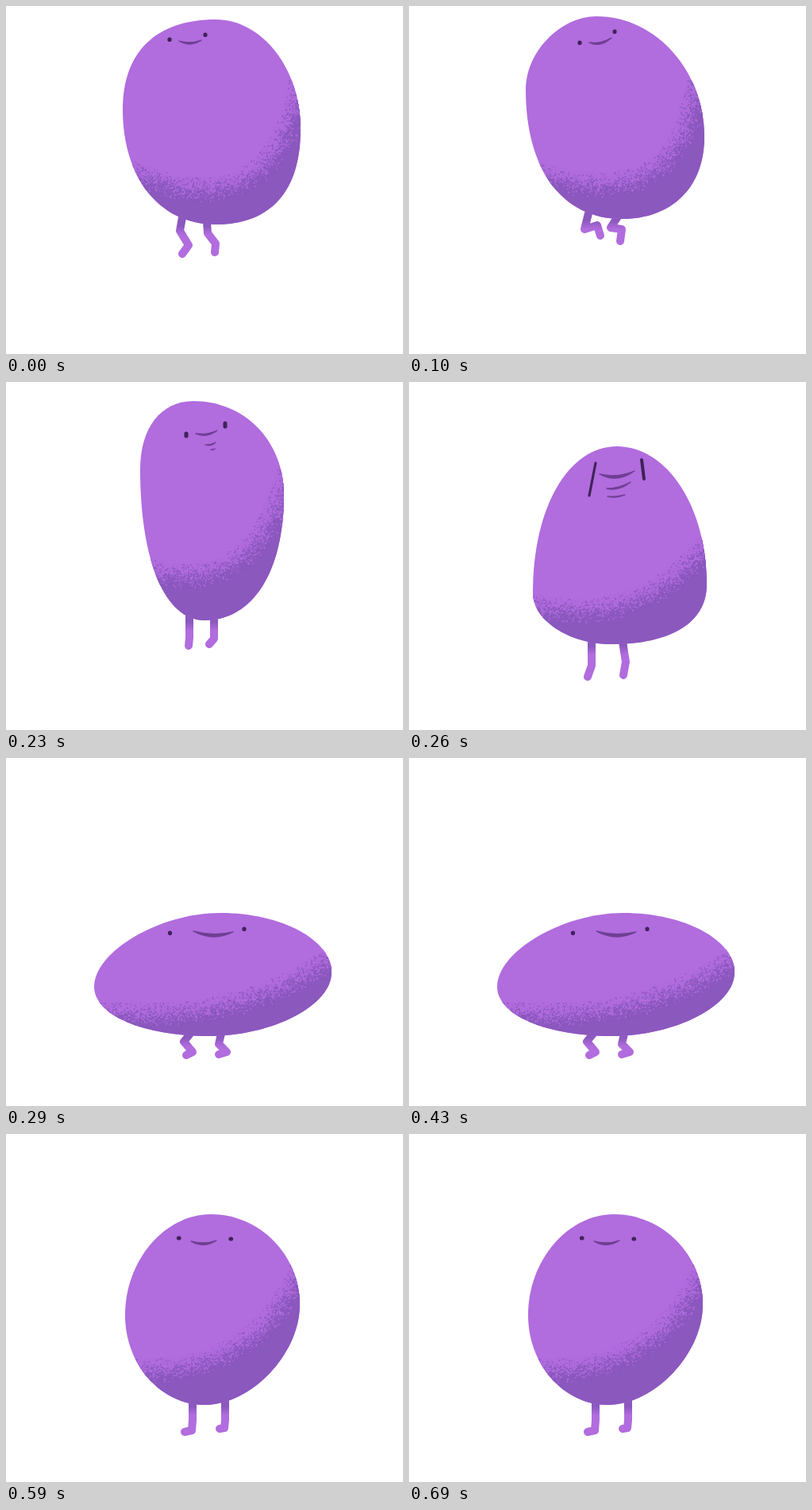
An HTML page with a canvas that plays this animation: 500 by 438 pixels, repeating every 760 ms.

```html
<!DOCTYPE html>
<html lang="en">
<head>
<meta charset="utf-8">
<title>Jumping blob</title>
<style>
html, body { margin: 0; width: 100%; height: 100%; overflow: hidden; background: #fff; }
canvas { display: block; }
</style>
</head>
<body>
<canvas id="stage" width="500" height="438"></canvas>
<script>
const ctx = document.getElementById('stage').getContext('2d');
const LIGHT = '#b16cde', DARK = '#8b58be', MOUTH = '#6f3f93', EYE = '#3f2358';

// hold: ms
// body: top, right, bottom and left extremes, each with the fullness of the arc that follows
// edge: start, control and end of the shadow's upper limit
// legs: hip, knee, ankle, toe
// eyes: x, y and the stroke they are stretched along
// lines: mouth and wrinkles as start, end, sag
const poses = [
  {
    hold: 100,
    body: [[264, 17, .55], [371, 155, .65], [264, 275, .6], [147, 130, .64]],
    edge: [155, 208, 336, 288, 372, 95],
    legs: [[222, 266, 219, 283, 230, 301, 222, 312], [253, 272, 254, 286, 264, 299, 263, 310]],
    eyes: [[206, 42, 0, .4], [251, 36, 0, .4]],
    lines: [[218, 44, 246, 43, 4.5]]
  },
  {
    hold: 130,
    body: [[236, 13, .55], [372, 165, .61], [268, 268, .62], [147, 105, .51]],
    edge: [158, 210, 343, 270, 363, 95],
    legs: [[226, 261, 221, 281, 237, 276, 241, 289], [263, 265, 254, 279, 268, 281, 266, 296]],
    eyes: [[215, 46, 0, .4], [259, 32, 0, .4]],
    lines: [[227, 46, 255, 40, 5]]
  },
  {
    hold: 30,
    body: [[236, 24, .57], [350, 142, .61], [250, 300, .61], [169, 110, .61]],
    edge: [172, 236, 314, 278, 357, 112],
    legs: [[231, 294, 231, 312, 231, 322, 230, 332], [262, 296, 262, 314, 262, 323, 256, 330]],
    eyes: [[227, 65, 0, 3], [276, 52, 0, 4]],
    lines: [[239, 65, 266, 61, 4], [251, 79, 264, 76, 2], [258, 85, 263, 84, 1]]
  },
  {
    hold: 30,
    body: [[262, 81, .56], [375, 255, .63], [255, 330, .54], [156, 265, .58]],
    edge: [145, 280, 288, 315, 378, 203],
    legs: [[230, 326, 230, 340, 230, 357, 225, 371], [269, 326, 271, 340, 273, 352, 270, 369]],
    eyes: [[235, 102, -8, 41], [293, 98, 3, 24]],
    lines: [[240, 116, 284, 112, 7], [249, 134, 279, 126, 4], [250, 144, 272, 142, 2]]
  },
  {
    hold: 230,
    body: [[270, 195, .55], [410, 270, .52], [255, 350, .57], [111, 288, .48]],
    edge: [115, 321, 304, 338, 418, 245],
    legs: [[232, 347, 224, 357, 235, 370, 227, 374], [271, 347, 268, 360, 278, 370, 268, 373]],
    eyes: [[206.5, 220, 0, .4], [300, 215, 0, .4]],
    lines: [[236, 218, 286, 219, 6.5]]
  },
  {
    hold: 70,
    body: [[265, 159, .51], [392, 258, .54], [252, 351, .53], [134, 268, .59]],
    edge: [175, 338, 318, 321, 398, 228],
    legs: [[231, 347, 226, 358, 235, 370, 226, 374], [273, 347, 271, 360, 278, 370, 269, 372]],
    eyes: [[218, 171, 0, 5], [288, 170, 0, 5]],
    lines: [[236, 185, 273, 182, 5]]
  },
  {
    hold: 170,
    body: [[258, 101, .55], [370, 215, .49], [250, 341, .55], [150, 228, .54]],
    edge: [160, 298, 317, 304, 374, 165],
    legs: [[235, 335, 235, 360, 234, 373, 225, 375], [276, 332, 276, 360, 275, 370, 269, 371]],
    eyes: [[217.5, 131, .5, 0], [283, 132, .5, 0]],
    lines: [[233, 135, 265, 134, 5]]
  }
];
const total = poses.reduce((sum, p) => sum + p.hold, 0);

function seeded(seed) {
  return () => (seed = seed * 16807 % 2147483647) / 2147483647;
}

// Four arcs whose tangents are level at top and bottom, upright at the sides.
function traceBody(body) {
  ctx.beginPath();
  ctx.moveTo(body[0][0], body[0][1]);
  body.forEach(([x, y, k], i) => {
    const [u, v] = body[(i + 1) % 4];
    if (i % 2) ctx.bezierCurveTo(x, y + k * (v - y), u + k * (x - u), v, u, v);
    else ctx.bezierCurveTo(x + k * (u - x), y, u, v + k * (y - v), u, v);
  });
}

function drawLeg(points, bottom) {
  const fade = ctx.createLinearGradient(0, bottom + 2, 0, bottom + 13);
  fade.addColorStop(0, DARK);
  fade.addColorStop(1, LIGHT);
  ctx.beginPath();
  for (let i = 0; i < points.length; i += 2) ctx.lineTo(points[i], points[i + 1]);
  ctx.lineWidth = 10;
  ctx.strokeStyle = fade;
  ctx.stroke();
}

function drawShade([x0, y0, cx, cy, x1, y1], random) {
  ctx.beginPath();
  ctx.moveTo(x0, y0);
  ctx.quadraticCurveTo(cx, cy, x1, y1);
  [[500, y1], [500, 438], [x0, 438]].forEach(p => ctx.lineTo(...p));
  ctx.fillStyle = DARK;
  ctx.fill();

  // Grain: across a band along the edge, the chance of a dark dot rises smoothly.
  for (let i = 0; i < 9000; i++) {
    const t = random(), s = 1 - t;
    const dx = s * (cx - x0) + t * (x1 - cx), dy = s * (cy - y0) + t * (y1 - cy);
    const off = (random() - .5) * 30 / Math.hypot(dx, dy);
    const noise = (random() + random() + random() - 1.5) * 20 / Math.hypot(dx, dy);
    const x = s * s * x0 + 2 * s * t * cx + t * t * x1 - dy * off;
    const y = s * s * y0 + 2 * s * t * cy + t * t * y1 + dx * off;
    ctx.fillStyle = off + noise > 0 ? DARK : LIGHT;
    ctx.fillRect(x - .8, y - .8, 1.7, 1.7);
  }
}

function drawEye([x, y, dx, dy]) {
  ctx.beginPath();
  ctx.moveTo(x, y);
  ctx.lineTo(x + dx, y + dy);
  ctx.lineWidth = 5.2 - dy * .05;
  ctx.strokeStyle = EYE;
  ctx.stroke();
}

function drawLine([x0, y0, x1, y1, sag]) {
  const cx = (x0 + x1) / 2, cy = (y0 + y1) / 2 + 2 * sag;
  ctx.beginPath();
  ctx.moveTo(x0, y0);
  ctx.quadraticCurveTo(cx, cy, x1, y1);
  ctx.quadraticCurveTo(cx, cy - sag, x0, y0);
  ctx.fillStyle = ctx.strokeStyle = MOUTH;
  ctx.lineWidth = 1.3;
  ctx.fill();
  ctx.stroke();
}

function draw(pose, seed) {
  ctx.fillStyle = '#fff';
  ctx.fillRect(0, 0, 500, 438);
  ctx.lineCap = ctx.lineJoin = 'round';
  pose.legs.forEach(leg => drawLeg(leg, pose.body[2][1]));

  ctx.save();
  traceBody(pose.body);
  ctx.fillStyle = LIGHT;
  ctx.fill();
  ctx.clip();
  drawShade(pose.edge, seeded(seed));
  ctx.restore();

  pose.eyes.forEach(drawEye);
  pose.lines.forEach(drawLine);
}

let shown = -1;
function tick() {
  let time = performance.now() % total, i = 0;
  while (time >= poses[i].hold) time -= poses[i++].hold;
  if (i !== shown) draw(poses[shown = i], 7919 * (i + 1));
  requestAnimationFrame(tick);
}
tick();
</script>
</body>
</html>
```
